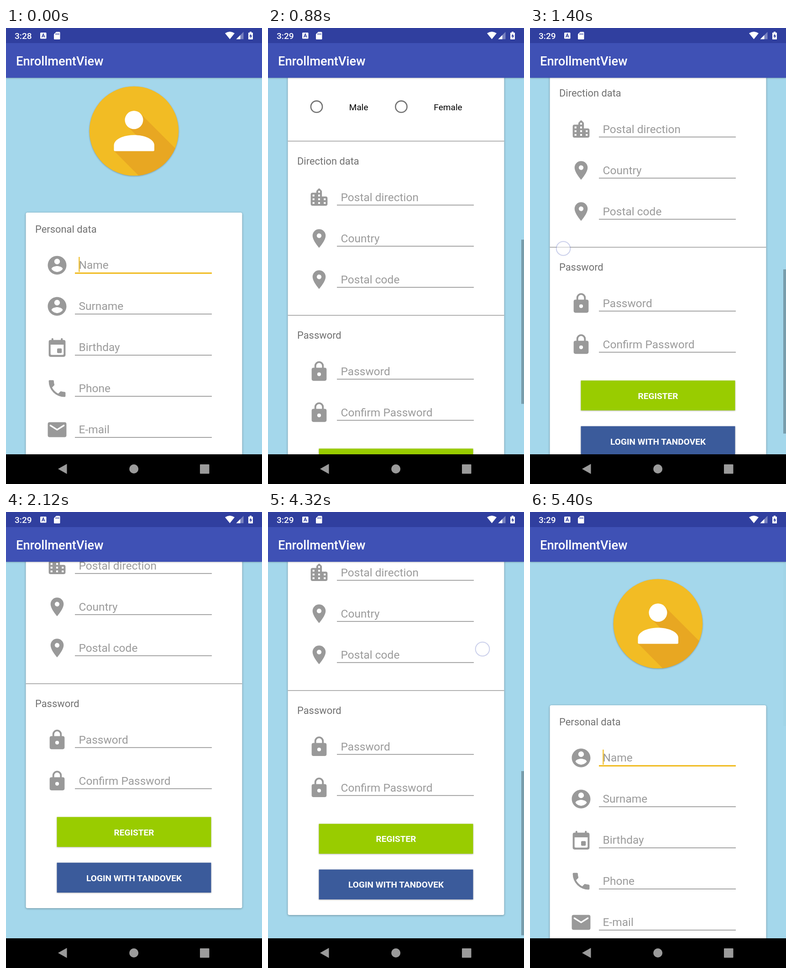
An HTML page that plays this animation: 561x998 px, repeating every 5680 ms.

```html
<!DOCTYPE html>
<html lang="en">
<head>
<meta charset="utf-8">
<style>
html, body { margin: 0; width: 100%; height: 100%; overflow: hidden; background: #a4d7eb; }
svg { display: block; }
text { font-family: Roboto, sans-serif; }
.card { fill: #fff; filter: drop-shadow(0 1.5px 2px rgba(0,0,0,.36)); }
.raised { filter: drop-shadow(0 1.5px 1.5px rgba(0,0,0,.3)); }
.section { font-size: 21.9px; fill: #717171; }
.hint { font-size: 24.5px; fill: #9b9b9b; }
.option { font-size: 19.1px; }
.button { font-size: 19.1px; font-weight: 700; fill: #fff; text-anchor: middle; }
</style>
</head>
<body>
<svg width="561" height="998" viewBox="0 0 561 998">
  <rect width="561" height="998" fill="#a4d7eb"/>
  <svg y="109" width="561" height="824" viewBox="0 109 561 824">
    <g id="page"></g>
    <rect id="bar" x="555" width="6"/>
  </svg>

  <rect y="33" width="561" height="76" fill="#3f51b5" style="filter:drop-shadow(0 1px 1.5px rgba(0,0,0,.25))"/>
  <rect width="561" height="33" fill="#303f9f"/>
  <text x="22" y="81.5" font-size="27.3" font-weight="500" fill="#fff">EnrollmentView</text>
  <g fill="#fff">
    <text id="clock" x="19" y="24" font-size="19.1" font-weight="500"></text>
    <rect x="75" y="10" width="13.5" height="13.5" rx="1.5"/>
    <path d="M78.5 20.5 81.7 12.8 85 20.5M79.7 18H83.8" fill="none" stroke="#303f9f" stroke-width="1.6"/>
    <path d="M110 8.5h7q1.5 0 1.5 1.5v13.5q0 1.5-1.5 1.5h-10.500q-1.500 0-1.500-1.500v-10z"/>
    <path d="M109.500 11.500v3.500m3-3.500v3.500m3-3.500v3.500" stroke="#303f9f" stroke-width="1.4"/>
    <path d="M480 11.500Q490.500 4.500 501 11.500L490.500 24.500z"/>
    <path d="M520.500 8.500V24.500H504.500z" opacity=".35"/>
    <path d="M513.500 15.500V24.500H504.500z"/>
    <path d="M534 8h4v2h2q1 0 1 1v13q0 1-1 1h-8q-1 0-1-1v-13q0-1 1-1h2z"/>
    <path d="M537 12.500 533 18.500h2.700v4.500l3.800-6.500h-2.500z" fill="#303f9f"/>
  </g>

  <rect y="933" width="561" height="65"/>
  <g fill="#9b9b9b">
    <path d="M114 965 133.500 954V976z"/>
    <circle cx="280.200" cy="965" r="10"/>
    <rect x="425" y="955" width="20.500" height="20.500" rx="1"/>
  </g>
  <circle id="touch" r="15.300" fill="#fff" fill-opacity=".5" stroke="#3f51b5" stroke-opacity=".27" stroke-width="2"/>
</svg>

<script>
const $ = id => document.getElementById(id);

// Icon outlines on a 24 unit grid
const icons = {
  user: 'M12 2C6.48 2 2 6.48 2 12s4.48 10 10 10 10-4.48 10-10S17.52 2 12 2zm0 3c1.66 0 3 1.34 3 3s-1.34 3-3 3-3-1.34-3-3 1.34-3 3-3zm0 14.2c-2.5 0-4.71-1.28-6-3.22.03-1.99 4-3.08 6-3.08s5.97 1.09 6 3.08c-1.29 1.94-3.5 3.22-6 3.22z',
  date: 'M16 13h-3q-1 0-1 1v3q0 1 1 1h3q1 0 1-1v-3q0-1-1-1zM16 3v1H8V3a1 1 0 0 0-2 0v1H5a2 2 0 0 0-2 2v14a2 2 0 0 0 2 2h14a2 2 0 0 0 2-2V6a2 2 0 0 0-2-2h-1V3a1 1 0 0 0-2 0zm2 17H6q-1 0-1-1V9h14v10q0 1-1 1z',
  phone: 'M6.62 10.79c1.44 2.83 3.76 5.14 6.59 6.59l2.2-2.2q.46-.44 1.02-.24c1.12.37 2.33.57 3.57.57q1 0 1 1V20q0 1-1 1A17 17 0 0 1 3 4q0-1 1-1h3.5q1 0 1 1c0 1.25.2 2.45.57 3.57q.18.6-.25 1.02z',
  mail: 'M20 4H4a2 2 0 0 0-2 2v12a2 2 0 0 0 2 2h16a2 2 0 0 0 2-2V6a2 2 0 0 0-2-2zm-.4 4.25-7.07 4.42q-.53.3-1.06 0L4.4 8.25C3.5 7.600 4.300 6.200 5.300 6.810L12 11l6.700-4.190c1-.600 1.800.800.900 1.440z',
  city: 'M15 11V5.800q0-.800-.600-1.400l-1.700-1.700q-.700-.600-1.400 0L9.600 4.400Q9 5 9 5.800V7H5a2 2 0 0 0-2 2v10a2 2 0 0 0 2 2h14a2 2 0 0 0 2-2v-6a2 2 0 0 0-2-2z'
    + [[5, 9], [5, 13], [5, 17], [11, 5], [11, 9], [11, 13], [11, 17], [17, 13], [17, 17]]
      .map(([x, y]) => `M${x} ${y}h2v2h-2z`).join(''),
  place: 'M12 2a7 7 0 0 0-7 7c0 5.250 7 13 7 13s7-7.750 7-13a7 7 0 0 0-7-7zm0 9.500a2.500 2.500 0 1 1 0-5 2.500 2.500 0 0 1 0 5z',
  lock: 'M18 8h-1V6A5 5 0 0 0 7 6v2H6a2 2 0 0 0-2 2v10a2 2 0 0 0 2 2h12a2 2 0 0 0 2-2V10a2 2 0 0 0-2-2zm-6 9a2 2 0 1 1 0-4 2 2 0 0 1 0 4zm3.100-9H8.900V6a3.100 3.100 0 0 1 6.200 0z'
};

const label = (kind, x, y, s) => `<text class="${kind}" x="${x}" y="${y}">${s}</text>`;
const rect = (x, y, w, h, fill, more = '') =>
  `<rect x="${x}" y="${y}" width="${w}" height="${h}" fill="${fill}" ${more}/>`;
const divider = y => rect(43.5, y, 474, 1.5, '#999');

const field = (icon, s, y, active) =>
  `<path transform="translate(112 ${y + .7}) scale(2.045) translate(-12 -12)" d="${icons[icon]}" fill="#999" fill-rule="evenodd"/>`
  + label('hint', 159.5, y + 8.7, s)
  + (active
    ? rect(151, y + 16.5, 300, 3, '#f0bb20') + rect(159.3, y - 17.5, 2.2, 33, '#f0bb20')
    : rect(151, y + 16.8, 300, 1.5, '#888'));

const option = (x, s) =>
  `<circle cx="${x}" cy="984.2" r="12.6" fill="none" stroke="#737373" stroke-width="2.6"/>`
  + label('option', x + 71.3, 991.6, s);

const button = (y, fill, s) =>
  rect(111.5, y, 338, 65.5, fill, 'class="raised"') + label('button', 280.5, y + 40, s);

const avatar = `
  <clipPath id="disc"><circle cx="280.5" cy="244.500" r="97.800"/></clipPath>
  <circle class="raised" cx="280.500" cy="244.500" r="97.800" fill="#f2bc24"/>
  <path clip-path="url(#disc)" fill="#e8a722" d="M294.500 206 420 331.500V420H368L237 288 266.500 234z"/>
  <path clip-path="url(#disc)" fill="#f2bc24" d="M266.500 234.500 286 254 237 270z"/>
  <g fill="#fff">
    <circle cx="280.500" cy="220.300" r="20"/>
    <path d="M236.500 286q0 2.500 2.500 2.500h83.500q2.500 0 2.500-2.500v-10C325 262 303 253.300 280.700 253.300S236.500 262 236.500 276z"/>
  </g>`;

$('page').innerHTML = avatar
  + rect(43.5, 423, 474, 1509, '#fff', 'rx="3.500" class="card"')
  + label('section', 64, 466.800, 'Personal data')
  + field('user', 'Name', 537.500, true)
  + field('user', 'Surname', 627.500)
  + field('date', 'Birthday', 717.500)
  + field('phone', 'Phone', 807.500)
  + field('mail', 'E-mail', 897.500)
  + option(106.500, 'Male') + option(292, 'Female')
  + divider(1058.800)
  + label('section', 64, 1111, 'Direction data')
  + field('city', 'Postal direction', 1182)
  + field('place', 'Country', 1272)
  + field('place', 'Postal code', 1362)
  + divider(1440)
  + label('section', 64, 1492, 'Password')
  + field('lock', 'Password', 1563)
  + field('lock', 'Confirm Password', 1653)
  + button(1732.500, '#99cc00', 'REGISTER')
  + button(1832.500, '#3b5b9b', 'LOGIN WITH TANDOVEK');

// Scroll offset: [time, pixels]
const keys = [[0, 19], [120, 19], [240, 180], [360, 385], [480, 560], [600, 685], [760, 782],
  [880, 812], [1040, 825], [1240, 830], [1320, 885], [1400, 961], [1480, 1030], [1580, 1065],
  [4300, 1065], [4360, 970], [4480, 551], [4600, 124], [4720, 25], [4880, 0], [5680, 0]];

const slope = i => (keys[i + 1][1] - keys[i][1]) / (keys[i + 1][0] - keys[i][0]);
const tangent = i => {
  if (i < 1 || i > keys.length - 2) return 0;
  const a = slope(i - 1), b = slope(i);
  return a * b > 0 ? 2 * a * b / (a + b) : 0;
};

// Monotone cubic through the keys
function scrollAt(t) {
  const i = keys.findIndex(k => k[0] > t) - 1;
  const [t0, s0] = keys[i], [t1, s1] = keys[i + 1];
  const d = t1 - t0, u = (t - t0) / d, v = 1 - u;
  return s0 * (1 + 2 * u) * v * v + s1 * u * u * (3 - 2 * u)
    + d * u * v * (tangent(i) * v - tangent(i + 1) * u);
}

// Finger drags: start time, x, y, end time, x, y
const drags = [[120, 450, 800, 360, 470, 430], [1240, 92, 618, 1400, 73, 482.500],
  [4320, 470, 300, 4480, 499, 814.500]];
// Spans during which the scrollbar is lit
const lit = [[120, 1870], [4320, 5165]];
const clamp = x => Math.max(0, Math.min(1, x));

function draw(t) {
  const s = scrollAt(t), view = 824, total = 1889;
  $('page').setAttribute('transform', `translate(0 ${-s})`);
  $('clock').textContent = t < 40 ? '3:28' : '3:29';

  const span = lit.find(([a, b]) => t >= a && t < b + 250);
  $('bar').setAttribute('y', 109 + s * view / total);
  $('bar').setAttribute('height', view * view / total);
  $('bar').setAttribute('opacity', span ? .27 * clamp(1 - (t - span[1]) / 250) : 0);

  const drag = drags.find(d => t >= d[0] && t < d[3] + 160);
  $('touch').setAttribute('opacity', drag ? clamp(1 - (t - drag[3]) / 160) : 0);
  if (drag) {
    const [t0, x0, y0, t1, x1, y1] = drag, u = clamp((t - t0) / (t1 - t0));
    $('touch').setAttribute('cx', x0 + (x1 - x0) * u);
    $('touch').setAttribute('cy', y0 + (y1 - y0) * u);
  }
}

const start = performance.now();
function tick() {
  const t = (performance.now() - start) % 5680;
  draw(Math.min(5400, Math.floor(t / 40) * 40));
  requestAnimationFrame(tick);
}
tick();
</script>
</body>
</html>
```
